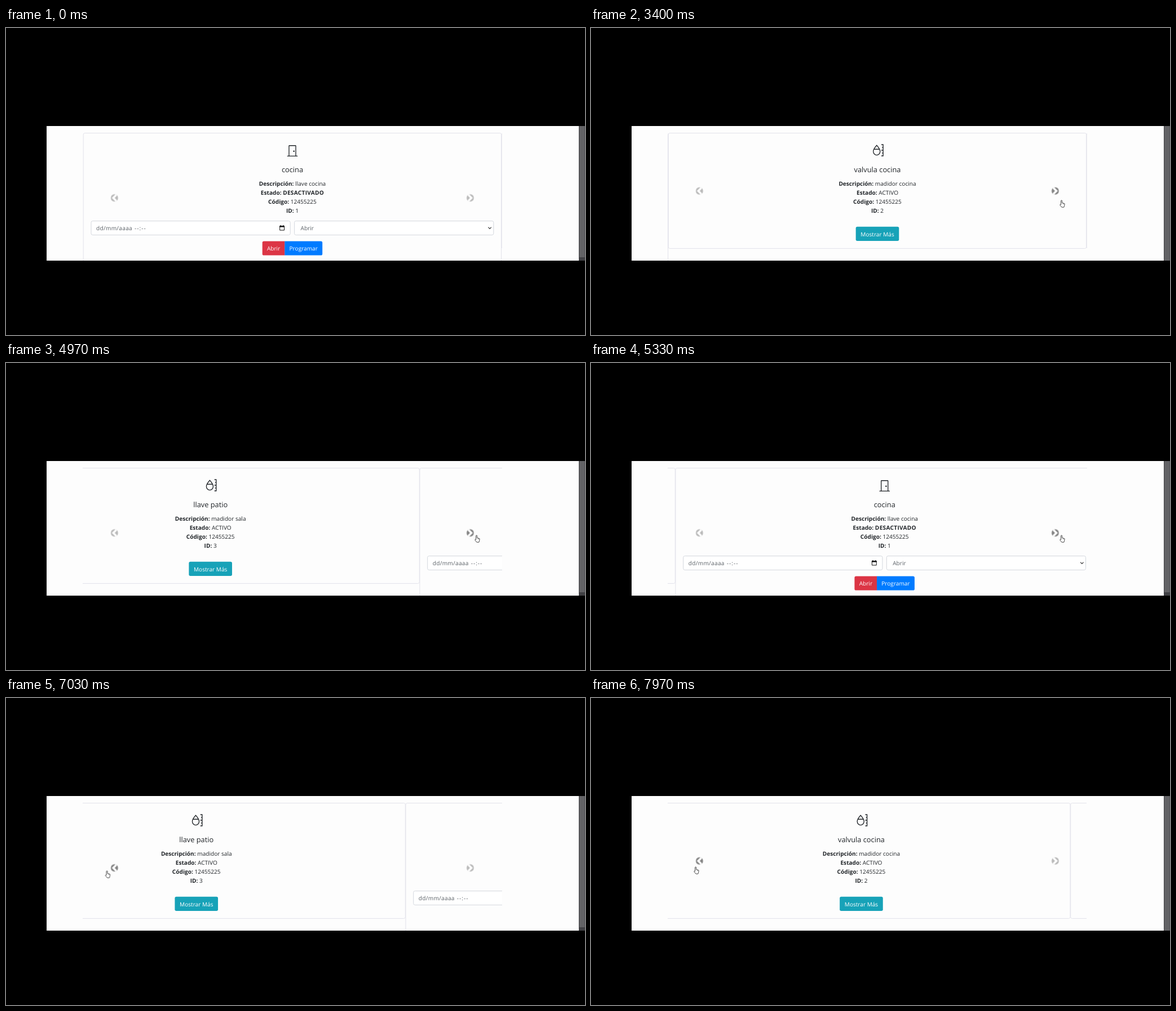
Write an HTML page that moves like this. It is 1027x545 px and loops after 8 s.

```html
<!DOCTYPE html>
<html lang="es">
<head>
<meta charset="utf-8">
<title>Carrusel de dispositivos</title>
<style>
  html, body { margin: 0; width: 100%; height: 100%; overflow: hidden; background: #000; }
  svg.stage { display: block; width: 1027px; height: 545px; }
  text { font: 10.1px "Open Sans", "Noto Sans", sans-serif; fill: #212529; text-rendering: geometricPrecision; white-space: pre; }
  .mid text, text.mid { text-anchor: middle; }
  b, .b { font-weight: 700; }
  .caps { letter-spacing: .3px; }
  text.title { font-size: 12.8px; font-weight: 500; }
  text.field { fill: #5a6066; }
  text.label { fill: #fff; }
  .line { fill: none; stroke: #e2e2ea; }
  .input { fill: #fff; stroke: #d3d7dd; }
  .glyph { fill: none; stroke: #212529; }

  .track, .tall, .thumb, .next, .prev, .cursor { animation: 8s infinite; }
  .track { animation-name: slide; animation-timing-function: ease-in-out; }
  .tall { animation-name: recenter; animation-timing-function: step-end; }
  .thumb { animation-name: thumb; animation-timing-function: step-end; }
  .next { animation-name: next; animation-timing-function: ease; }
  .prev { animation-name: prev; animation-timing-function: ease; }
  .cursor { animation-name: point; animation-timing-function: linear; }

  @keyframes slide {
    0%, 31.375% { transform: translateX(0); }
    38.875%, 47.288% { transform: translateX(-742px); }
    54.788%, 59.838% { transform: translateX(-1484px); }
    67.338%, 82.875% { transform: translateX(-2226px); }
    90.375% { transform: translateX(-1484px); }
    /* the last slide is cut just before it settles */
    93.175% { transform: translateX(-1484px); animation-timing-function: cubic-bezier(.427, 0, .61, .87); }
    100% { transform: translateX(-753.9px); }
  }
  @keyframes recenter {
    0%, 59.838% { transform: translateY(0); }
    38.875%, 90.375%, 100% { transform: translateY(-12.4px); }
  }
  @keyframes thumb {
    0%, 59.838% { transform: translateY(0); }
    38.875%, 90.375%, 100% { transform: translateY(7px); }
  }
  @keyframes next {
    0%, 6.1%, 19.2%, 24%, 84.7%, 100% { opacity: .5; }
    8.1%, 17.4%, 25.9%, 82.8% { opacity: .9; }
  }
  @keyframes prev {
    0%, 71.3% { opacity: .5; }
    73.2%, 100% { opacity: .9; }
  }
  @keyframes point {
    0% { transform: translate(831px, 305px); visibility: hidden; animation-timing-function: step-end; }
    29.2%, 67.9% { transform: translate(831px, 305px); visibility: visible; }
    69.6% { transform: translate(790px, 420px); visibility: visible; animation-timing-function: step-end; }
    71.2% { transform: translate(133px, 409px); visibility: visible; animation-timing-function: ease-out; }
    76.1%, 79.1% { transform: translate(172.5px, 306px); visibility: visible; }
    80.4%, 90.4% { transform: translate(175.5px, 306px); visibility: visible; }
    92.5%, 100% { transform: translate(182px, 299px); visibility: visible; }
  }
</style>
</head>
<body>
<svg class="stage" viewBox="0 0 1027 545">
  <defs>
    <clipPath id="panel"><rect x="72" y="174" width="955" height="239"/></clipPath>
    <clipPath id="window"><rect x="136.2" y="174" width="743.1" height="239"/></clipPath>
    <clipPath id="disc"><circle r="6.7"/></clipPath>

    <g id="arrow" clip-path="url(#disc)">
      <circle r="6.7" fill="#797979"/>
      <path transform="scale(1.675) translate(-4 -4)" fill="#fff" d="M2.75 0l-1.5 1.5L3.75 4l-2.5 2.5L2.75 8l4-4-4-4z"/>
    </g>

    <g id="moisture" transform="translate(497.4 206.3) scale(1.338)" class="glyph">
      <path d="M7 1.5C5 3.7 2.5 7 2.5 9.7a4.5 4.8 0 0 0 9 0C11.5 7 9 3.7 7 1.5ZM3.6 6.7h6.8"/>
      <path d="M13.5.5h2v15h-2M15.5 8h-2M15.5 4.25h-1M15.5 11.75h-1" stroke-linecap="round"/>
    </g>

    <g id="sensor">
      <rect class="line" x="137.2" y="186.6" width="741.4" height="204.8" rx="2.7"/>
      <use href="#moisture"/>
      <rect x="469.7" y="352.7" width="76.6" height="25.2" rx="2.7" fill="#17a2b8"/>
      <text class="label mid" x="508" y="369.8">Mostrar Más</text>
    </g>

    <g id="door">
      <rect class="line" x="137.2" y="186.6" width="741.4" height="240" rx="2.7"/>
      <g transform="translate(497.3 206.7) scale(1.338)">
        <path class="glyph" d="M1.5 15.5h13M3.5 15.5V2a.5.5 0 0 1 .5-.5h8a.5.5 0 0 1 .5.5v13.5" stroke-linecap="round"/>
        <circle cx="10" cy="9" r="1" fill="#212529"/>
      </g>
      <g class="mid">
        <text class="title" x="508" y="256.2">cocina</text>
        <text x="508" y="279.7"><tspan class="b">Descripción:</tspan> llave cocina</text>
        <text x="508" y="295.7" class="b">Estado: <tspan class="caps">DESACTIVADO</tspan></text>
        <text x="508" y="311.8"><tspan class="b">Código:</tspan> 12455225</text>
        <text x="508" y="327.8"><tspan class="b">ID:</tspan> 1</text>
      </g>
      <rect class="input" x="151" y="342.6" width="353.2" height="24.8" rx="2.7"/>
      <text class="field" x="160" y="359.2" letter-spacing=".3">dd/mm/aaaa</text>
      <text class="field" x="228" y="359.2" letter-spacing="1">--:--</text>
      <path d="M485.7 351.7h7.8v7.3h-7.8z" fill="none" stroke="#111"/>
      <path d="M485.2 351.2h8.8v2.3h-8.8zM486.6 350h1.2v1.5h-1.2zM491.4 350h1.2v1.5h-1.2z" fill="#111"/>
      <rect class="input" x="511.6" y="342.6" width="353.2" height="24.8" rx="2.7"/>
      <text class="field" x="522.5" y="359.2">Abrir</text>
      <path d="M855.4 353.7l2.7 2.7 2.7-2.7" fill="none" stroke="#333" stroke-width="1.2"/>
      <path d="M494.5 378.4h-37.1a2.7 2.7 0 0 0-2.7 2.7v19.8a2.7 2.7 0 0 0 2.7 2.7h37.1z" fill="#dc3545"/>
      <path d="M494.3 378.4h64.2a2.7 2.7 0 0 1 2.7 2.7v19.8a2.7 2.7 0 0 1-2.7 2.7h-64.2z" fill="#007bff"/>
      <text class="label mid" x="474.6" y="395">Abrir</text>
      <text class="label mid" x="527.7" y="395">Programar</text>
    </g>
  </defs>

  <rect width="1027" height="545"/>
  <g clip-path="url(#panel)">
    <rect x="72" y="174" width="944.5" height="239" fill="#fdfdfd"/>

    <g clip-path="url(#window)">
      <g class="track">
        <use href="#door"/>
        <g transform="translate(742)" class="mid">
          <use href="#sensor"/>
          <text class="title" x="508" y="256.2">valvula cocina</text>
          <text x="508" y="279.7"><tspan class="b">Descripción:</tspan> madidor cocina</text>
          <text x="508" y="295.7"><tspan class="b">Estado:</tspan> ACTIVO</text>
          <text x="508" y="311.8"><tspan class="b">Código:</tspan> 12455225</text>
          <text x="508" y="327.8"><tspan class="b">ID:</tspan> 2</text>
        </g>
        <g transform="translate(1484)" class="mid">
          <use href="#sensor"/>
          <text class="title" x="508" y="256.2">llave patio</text>
          <text x="508" y="279.7"><tspan class="b">Descripción:</tspan> madidor sala</text>
          <text x="508" y="295.7"><tspan class="b">Estado:</tspan> ACTIVO</text>
          <text x="508" y="311.8"><tspan class="b">Código:</tspan> 12455225</text>
          <text x="508" y="327.8"><tspan class="b">ID:</tspan> 3</text>
        </g>
        <use href="#door" x="2226"/>
      </g>
    </g>

    <g class="tall">
      <g class="prev"><use href="#arrow" transform="translate(192.4 301.6) scale(-1 1)"/></g>
      <g class="next"><use href="#arrow" transform="translate(823.4 301.6)"/></g>
    </g>

    <rect x="1016" y="174" width="11" height="239" fill="#404044"/>
    <rect class="thumb" x="1017" y="160" width="9.5" height="247" fill="#636366"/>

    <g class="cursor">
      <path d="M2.6 8.6V1.9a1 1 0 0 1 2 0v3.6l3.4.8c.8.2 1.2.7 1.1 1.4l-.5 3.1-.8 2.4H4L.9 9.4c-.5-.8.4-1.5 1-.9z"
            fill="#fff" stroke="#333" stroke-width=".9" stroke-linejoin="round"/>
      <path d="M6.2 6.2v1.6M7.6 6.6v1.4" stroke="#555" stroke-width=".6"/>
    </g>
  </g>
</svg>
</body>
</html>
```
